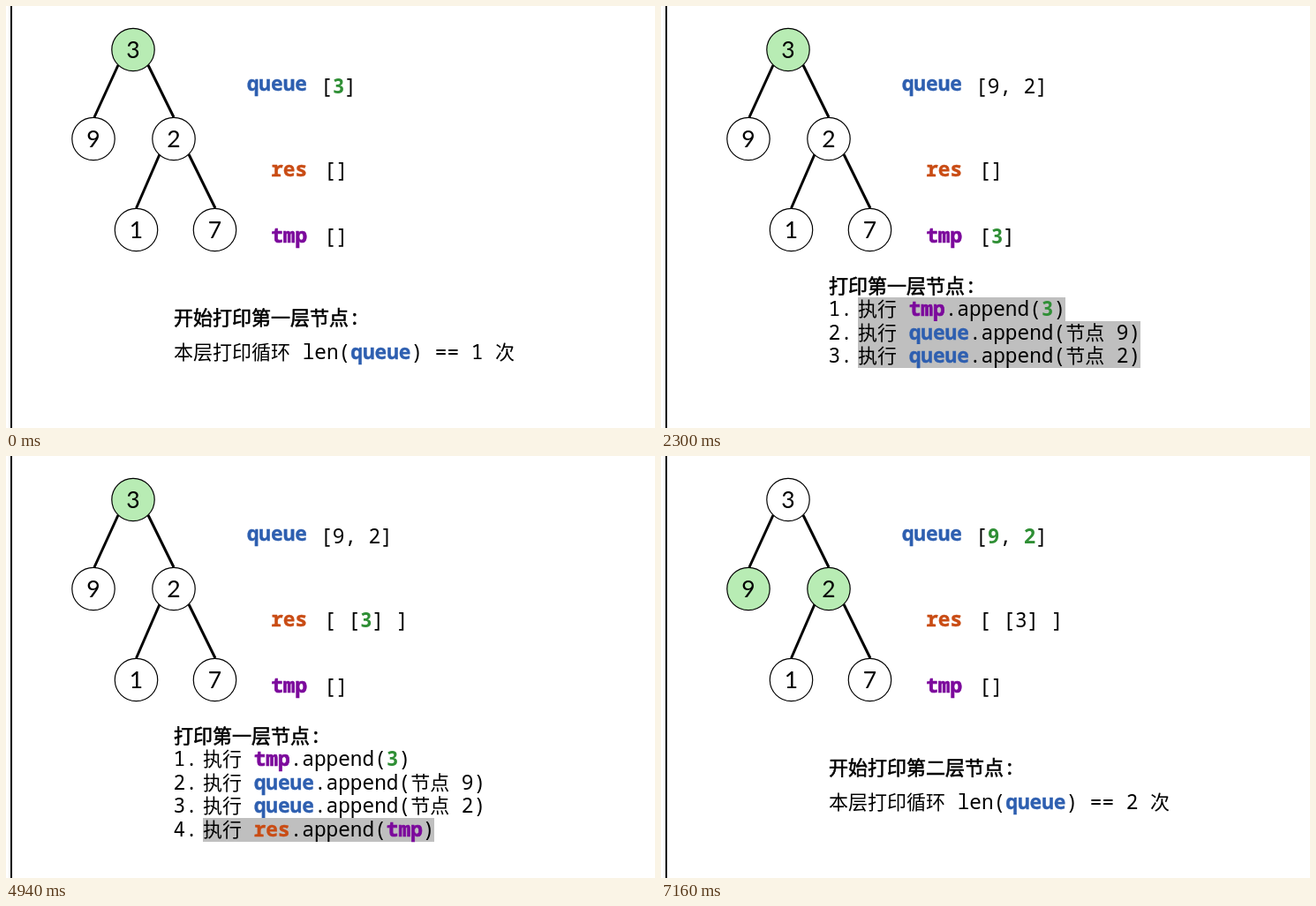
Recreate the animation shown at these times as an HTML page. Size 735 by 478 pixels, loop 8 s.

```html
<!DOCTYPE html>
<html lang="zh-CN">
<head>
<meta charset="utf-8">
<title>Level-order traversal</title>
<style>
  html, body { margin: 0; width: 100%; height: 100%; overflow: hidden; background: #fff; }
  svg { display: block; width: 735px; height: 478px; }
  text { font: 22.75px "Noto Sans Mono", monospace; white-space: pre; }
  .han { font: 300 22px "Noto Sans CJK SC", "Noto Sans CJK JP", "Noto Sans CJK", sans-serif; }
  .title { stroke: #000; stroke-width: .6px; }
  .queue, .res, .tmp, .new { font-weight: 700; stroke-width: .4px; }
  .queue { fill: #2e5fb0; stroke: #2e5fb0; }
  .res { fill: #c94c14; stroke: #c94c14; }
  .tmp { fill: #7c0a9c; stroke: #7c0a9c; stroke-width: .7px; }
  .new { fill: #2f8f35; }
  .digit { font: 26.5px Lato, sans-serif; text-anchor: middle; }
  .node { stroke: #000; stroke-width: 1.2px; }
  .edge { stroke: #000; stroke-width: 3px; }
</style>
</head>
<body>
<svg id="stage" viewBox="0 0 735 478"></svg>
<script>
const stage = document.getElementById("stage");
const span = (cls, s) => `<tspan class="${cls}">${s}</tspan>`;

// Colours variable names and *marked* values, sets Chinese runs in their own font.
const markup = s => s.replace(/(queue|res|tmp)|\*(.+?)\*|([\u4e00-\u9fff]+)/g,
  (_, name, fresh, han) => name ? span(name, name) : fresh ? span("new", fresh) : span("han", han));
const text = (x, y, s, cls = "") => `<text x="${x}" y="${y}" class="${cls}">${markup(s)}</text>`;

const nodes = [[3, 144, 49.5], [9, 99, 150.5], [2, 190, 150.5], [1, 147.5, 253.5], [7, 236.5, 253.5]];
const edges = ["M127 67L100 126", "M161 67L190 126", "M174 168L147.5 229", "M207 168L237 229"];

const tree = active =>
  `<path class="edge" d="${edges.join("")}"/>` +
  nodes.map(([value, x, y]) =>
    `<circle class="node" cx="${x}" cy="${y}" r="24.2" fill="${active.includes(value) ? "#b8ecb4" : "#fff"}"/>` +
    `<text class="digit" x="${x}" y="${y + 9.5}">${value}</text>`).join("");

const intro = (level, count) =>
  text(190, 361, `开始打印第${level}层节点:`, "title") +
  text(190, 400, `本层打印循环 len(queue) == ${count} 次`);

const calls = ["tmp.append(*3*)", "queue.append(节点 9)", "queue.append(节点 2)", "res.append(tmp)"];
const callEnds = [458, 543, 543, 485];

function steps(first, last) {
  let out = text(190, 325, "打印第一层节点:", "title");
  for (let i = 0; i < last; i++) {
    const top = Math.round(330 + i * 26.7);
    if (i >= first)
      out += `<rect x="223" y="${top}" width="${callEnds[i] - 223}" height="27" fill="#bfbfbf"/>`;
    out += text(189.5, top + 21, `${i + 1}.`) + text(223, top + 21, `执行 ${calls[i]}`);
  }
  return out;
}

const scenes = [
  { end: 500, active: [3], queue: "[*3*]", res: "[]", tmp: "[]", notes: intro("一", 1) },
  { end: 3500, active: [3], queue: "[9, 2]", res: "[]", tmp: "[*3*]", notes: steps(0, 3) },
  { end: 5900, active: [3], queue: "[9, 2]", res: "[ [*3*] ]", tmp: "[]", notes: steps(3, 4) },
  { end: 8000, active: [9, 2], queue: "[*9*, *2*]", res: "[ [3] ]", tmp: "[]", notes: intro("二", 2) },
];

const draw = s =>
  `<path d="M6 0V478" stroke="#000" stroke-width="2"/>` + tree(s.active) +
  text(272.7, 96, "queue") + text(356, 99, s.queue) +
  text(300.2, 192.5, "res") + text(360, 194, s.res) +
  text(300.2, 267.5, "tmp") + text(360, 269, s.tmp) + s.notes;

let shown;
function tick() {
  const time = performance.now() % 8000;
  const scene = scenes.find(s => time < s.end);
  if (scene !== shown) stage.innerHTML = draw(shown = scene);
  requestAnimationFrame(tick);
}
tick();
</script>
</body>
</html>
```
